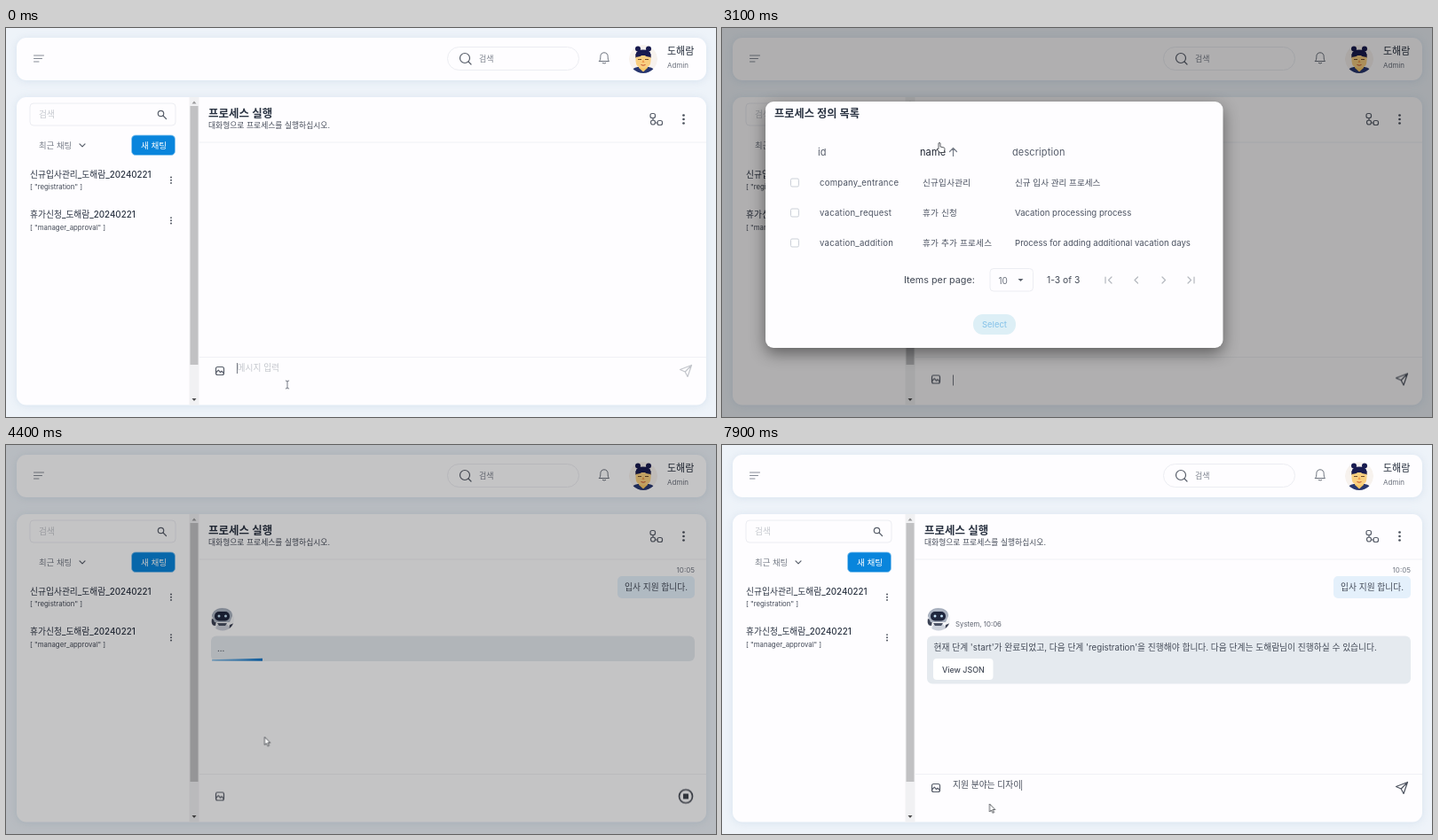
These frames come from a looping animation (800x439 px, 8 s). An HTML page:

```html
<!DOCTYPE html>
<html lang="ko">
<head>
<meta charset="utf-8">
<title>프로세스 실행</title>
<style>
html, body { margin: 0; width: 100%; height: 100%; overflow: hidden; background: #eef3f9; }
svg { display: block; width: 100vw; height: 100vh; }
text { font-family: Inter, "Noto Sans CJK KR", "Noto Sans CJK", sans-serif; fill: #444b58; white-space: pre; }
.b { font-weight: 600; fill: #2a3342; }
.m { font-weight: 500; }
.t8 { font-size: 8px; }
.t9 { font-size: 9.75px; }
.item { font-size: 9.75px; font-weight: 500; fill: #2a3342; }
.state { font-size: 7.8px; }
.cell { font-size: 9.6px; fill: #4b5261; }
.sp { letter-spacing: .22px; }
.head { font-size: 11px; fill: #555c6a; letter-spacing: .12px; }
.line { fill: none; stroke: #585e6a; stroke-width: 1.2; stroke-linecap: round; stroke-linejoin: round; }
.card { fill: #fefdff; filter: drop-shadow(0 1px 4px #c9d8e8a0); }
.box { fill: #fefdff; stroke: #ecedf2; }

.smooth, .step { animation-duration: 8s; animation-iteration-count: infinite; }
.smooth { animation-timing-function: ease-in-out; }
.step { animation-timing-function: step-end; }

.row { animation-name: row; }
@keyframes row {
  0%, 85.6%, 100% { transform: none; }
  32.5% { transform: translateY(var(--dy)); }
}
.chat { animation-name: chat; }
@keyframes chat { 0% { opacity: 0; } 51.25%, 100% { opacity: 1; } }
.wait { animation-name: wait; }
@keyframes wait { 0%, 75%, 100% { opacity: 0; } 51.25% { opacity: 1; } }
.reply { animation-name: reply; }
@keyframes reply { 0% { opacity: 0; } 75%, 100% { opacity: 1; } }
.send { animation-name: send; }
@keyframes send {
  0% { stroke: #c2c5cb; opacity: 1; }
  1.2%, 75%, 100% { stroke: #4d535f; opacity: 1; }
  51.25% { stroke: #4d535f; opacity: 0; }
}
.bar { animation-name: bar; animation-timing-function: linear; }
@keyframes bar {
  0%, 53.69%, 68.7% { transform: none; }
  68.69%, 83.7%, 100% { transform: translateX(651px); }
}
.dim { animation-name: dim; }
@keyframes dim { 0%, 36.3%, 57%, 100% { opacity: 0; } 38%, 53.9% { opacity: .31; } }
.modal { animation-name: modal; transform-origin: 306px 222px; }
@keyframes modal {
  0%, 36.3%, 52.8%, 100% { opacity: 0; transform: scale(.9); }
  38.5%, 51% { opacity: 1; transform: none; }
}
.checked { animation-name: checked; }
@keyframes checked { 0%, 100% { opacity: 0; } 44.4% { opacity: 1; } }
.select { animation-name: select; }
@keyframes select { 0%, 100% { opacity: .5; } 44.4% { opacity: 1; } }
.hover { animation-name: hover; }
@keyframes hover { 0%, 40.5%, 100% { fill: #555c6a; } 38% { fill: #1d2330; } }

.mouse { animation-name: mouse; }
@keyframes mouse {
  0%, 32.49% { transform: translate(317px, 402px); }
  33.75%, 36.25% { transform: translate(296.5px, 327px); }
  38.5%, 40% { transform: translate(244px, 129px); }
  43.5%, 45.5% { transform: translate(82px, 172px); }
  50%, 53.75% { transform: translate(292px, 329.5px); }
  57.5%, 82.6% { transform: translate(289.5px, 329.5px); }
  85%, 100% { transform: translate(301.5px, 405px); }
}
.ibeam { animation-name: ibeam; }
@keyframes ibeam { 0%, 100% { opacity: 1; } 32.5% { opacity: 0; } }
.arrow { animation-name: arrow; }
@keyframes arrow {
  0%, 38.3%, 42.8%, 49.3% { opacity: 0; }
  32.5%, 40.3%, 45.8%, 51.4%, 100% { opacity: 1; }
}
.hand { animation-name: hand; }
@keyframes hand {
  0%, 40.3%, 45.8%, 51.4%, 100% { opacity: 0; }
  38.3%, 42.8%, 49.3% { opacity: 1; }
}
</style>
</head>
<body>
<svg viewBox="0 0 800 439" preserveAspectRatio="none">
  <defs>
    <linearGradient id="glow">
      <stop offset="0" stop-color="#1a7fd0" stop-opacity="0"/>
      <stop offset=".5" stop-color="#5aa9e4" stop-opacity=".7"/>
      <stop offset="1" stop-color="#0f74c8"/>
    </linearGradient>
    <clipPath id="track"><rect x="232" y="238" width="541" height="8"/></clipPath>
    <clipPath id="face"><circle cx="718" cy="35" r="16"/></clipPath>
    <clipPath id="botClip"><circle cx="244" cy="196.5" r="13"/></clipPath>
    <g id="dots"><circle cy="-3.2" r=".95"/><circle r=".95"/><circle cy="3.2" r=".95"/></g>
    <rect id="check" x="77.5" y="-4.5" width="9" height="9" rx="1.5" fill="#fff" stroke="#cbd0d8"/>
  </defs>

  <rect width="800" height="439" fill="#eef3f9"/>
  <rect class="card" x="12" y="11" width="777" height="48" rx="11"/>
  <rect class="card" x="12" y="78" width="777" height="347.5" rx="11"/>

  <!-- top bar -->
  <path class="line" d="M31.5 31h11M31.5 34.5h9M31.5 38h5.5" style="stroke:#858b95;stroke-width:1"/>
  <rect class="box" x="497.5" y="21.5" width="148" height="26" rx="13"/>
  <g class="line"><circle cx="517" cy="34" r="5.5"/><path d="M521 38l3 3"/></g>
  <text x="533" y="38" font-size="9" style="fill:#7c828d">검색</text>
  <path class="line" d="M668.5 37.5h11c-1.300-1.500-1.300-3-1.300-5 0-3-1.700-4.700-4.200-4.700s-4.200 1.700-4.200 4.700c0 2 0 3.500-1.300 5zM672.300 39.500q1.700 1.300 3.400 0" style="stroke:#6b717c;stroke-width:1"/>
  <g clip-path="url(#face)">
    <circle cx="718" cy="35" r="16" fill="#f7f2ee"/>
    <path d="M705 51q0-6.5 7-7h12q7 .5 7 7v1h-26z" fill="#27366f"/>
    <path d="M713 43h10v2l-5 4.500-5-4.500z" fill="#f7c766"/>
    <path d="M709.500 34v-4q1-5.500 8.500-5.500t8.500 5.500v4z" fill="#181b50"/>
    <path d="M709.500 31h17v6q0 8-8.500 8.500-8.500-.5-8.500-8.500z" fill="#f9cf80"/>
    <path d="M709.500 33v-3q1-5 8.500-5t8.500 5v3q-6-.5-8.500-3.500-2.500 3-8.500 3.500z" fill="#181b50"/>
    <path d="M712 35.500h4M720 35.500h4" stroke="#6d4a2b" stroke-width="1"/>
    <path d="M718 35.500l1.500 3.500h-3z" fill="#ef9a4a"/>
    <path d="M715.500 41.500q2.500 1.500 5 0" fill="none" stroke="#c2512f"/>
  </g>
  <g fill="#181b50"><circle cx="712" cy="23.500" r="3"/><circle cx="724" cy="23.500" r="3"/></g>
  <text class="m" x="745" y="30.200" font-size="11" style="fill:#222b3a">도해람</text>
  <text class="t8" x="745" y="45" style="fill:#6b717d">Admin</text>

  <!-- sidebar -->
  <rect class="box" x="27" y="85" width="164" height="25" rx="4"/>
  <text class="t9" x="37" y="101" style="fill:#c6c9cf">검색</text>
  <g class="line"><circle cx="174.500" cy="96.500" r="3.200"/><path d="M177 99l3.500 3.500"/></g>
  <text x="37" y="135.700" font-size="9.400" style="fill:#777d88">최근 채팅</text>
  <path class="line" d="M83 130.800l3 3 3-3"/>
  <rect x="141.500" y="121" width="49" height="22.500" rx="4.500" fill="#0985dc" stroke="#8fc8f0" stroke-width=".8"/>
  <text class="m" x="152" y="135.700" font-size="9.600" style="fill:#fff">새 채팅</text>
  <text class="item" x="27" y="168.700">신규입사관리_도해람_20240221</text>
  <text class="state" x="27" y="182.200">[ "registration" ]</text>
  <text class="item" x="27" y="214.200">휴가신청_도해람_20240221</text>
  <text class="state" x="27" y="227.700">[ "manager_approval" ]</text>
  <g fill="#4a505c">
    <use href="#dots" x="186" y="171.700"/>
    <use href="#dots" x="186" y="217.300"/>
    <use href="#dots" transform="translate(763.500 103) scale(1.400)"/>
  </g>
  <rect x="206.500" y="78" width="11" height="347.500" fill="#f1f1f3"/>
  <rect x="207.500" y="88" width="9" height="292" fill="#c1c1c3"/>
  <path d="M209.500 85.500l2.500-3 2.500 3z" fill="#9a9a9c"/>
  <path d="M209.500 418l2.500 3 2.500-3z" fill="#4c4c4e"/>

  <!-- chat head -->
  <text class="b" x="228" y="100.700" font-size="12.500">프로세스 실행</text>
  <text x="228" y="113.300" font-size="8.800">대화형으로 프로세스를 실행하십시오.</text>
  <g class="line"><rect x="726" y="96.500" width="5.500" height="5" rx="2"/><circle cx="729" cy="106.500" r="2.500"/><rect x="734" y="104.500" width="5.500" height="5" rx="2"/><path d="M729 101.500v2.500M731.500 107h2.500"/></g>
  <path d="M218 129h571M218 371.500h571" stroke="#f0f1f5"/>

  <!-- messages -->
  <g class="step chat">
    <text class="t8" x="776" y="143.500" text-anchor="end" style="fill:#737985">10:05</text>
    <rect x="689" y="148" width="87" height="25" rx="5" fill="#e4f0fb"/>
    <text class="t9" x="697" y="163.600">입사 지원 합니다.</text>
    <g clip-path="url(#botClip)">
      <rect x="231" y="183" width="26" height="27" fill="#f3f4f7"/>
      <path d="M232 196l5 2-1 6-5-1zM252 203l5-2v8h-6z" fill="#3b4154"/>
      <path d="M236 210q0-9 8-9t8 9z" fill="#cdd2dc"/>
      <path d="M238 201h11l-2 3h-7z" fill="#4a5164"/>
      <path d="M232 193q0-9 11.500-9t11.500 9l-3 7h-17z" fill="#aab2c0"/>
      <rect x="235" y="188" width="17" height="10.500" rx="5" fill="#1f263d"/>
      <g fill="#c3e0f5"><circle cx="240" cy="193" r="1.500"/><circle cx="247.500" cy="193" r="1.500"/></g>
    </g>
  </g>
  <g class="step wait">
    <rect x="231" y="215.500" width="545" height="28.500" rx="6" fill="#e5eaef"/>
    <text class="t9" x="238" y="232.500">...</text>
    <g clip-path="url(#track)"><path class="smooth bar" d="M122 243.500L232 240.800V243.800z" fill="url(#glow)"/></g>
  </g>
  <g class="step reply">
    <text x="263" y="205" font-size="7.800" style="fill:#5b616d">System, 10:06</text>
    <rect x="231" y="215.500" width="545" height="54" rx="6" fill="#e5eaef"/>
    <text class="t9" x="238.500" y="231.600">현재 단계 'start'가 완료되었고, 다음 단계 'registration'을 진행해야 합니다. 다음 단계는 도해람님이 진행하실 수 있습니다.</text>
    <rect x="238" y="241" width="67.500" height="24" rx="4" fill="#fff"/>
    <text class="m" x="248" y="256.500" font-size="8.900">View JSON</text>
  </g>

  <!-- message field -->
  <g class="step row" style="--dy:9.5px">
    <g class="line"><rect x="236.500" y="382.500" width="9" height="9" rx="2"/><path d="M237 388.500l2.300-2.300 2.200 2.300 1.500-1.300 2.200 2"/></g>
    <path class="line step send" d="M759.500 385.500l13-5-4.500 13-2.800-5.500zM765.200 388l7.300-7.500"/>
    <g class="step wait"><circle cx="766" cy="387" r="7.500" fill="none" stroke="#4a4f59" stroke-width="1.700"/><rect x="763" y="384" width="6" height="6" rx=".5" fill="#3f444e"/></g>
  </g>
  <text class="t9" id="hint" x="260.500" y="386.800" style="fill:#c3c6cc">메시지 입력</text>
  <g class="step row" style="--dy:13.5px">
    <text class="t9" id="msg" x="260" y="386.800"></text>
    <rect id="caret" x="260" y="378" width=".8" height="12" fill="#555b67"/>
  </g>

  <!-- process list -->
  <rect class="smooth dim" width="800" height="439"/>
  <g class="smooth modal">
    <rect x="49" y="83" width="515.500" height="278" rx="9" fill="#fefdff" style="filter:drop-shadow(0 6px 9px #0007)"/>
    <text class="b" x="59" y="101.300" font-size="12.200">프로세스 정의 목록</text>
    <text class="head" x="108" y="144">id</text>
    <text class="head step hover" x="223" y="144">name</text>
    <path class="line" d="M260.500 144.500v-8.500M256.500 139.500l4-4 4 4" style="stroke:#777d88"/>
    <text class="head" x="327" y="144">description</text>
    <use href="#check" y="174.500"/><use href="#check" y="208.500"/><use href="#check" y="242.500"/>
    <g class="step checked"><rect x="77" y="169.500" width="10" height="10" rx="2" fill="#0985dc"/><path class="line" d="M79.500 174.500l2 2 3.500-4" style="stroke:#fff"/></g>
    <text class="cell sp" x="110" y="178">company_entrance</text>
    <text class="cell sp" x="226" y="178">신규입사관리</text>
    <text class="cell" x="330" y="178">신규 입사 관리 프로세스</text>
    <text class="cell sp" x="110" y="212">vacation_request</text>
    <text class="cell sp" x="226" y="212">휴가 신청</text>
    <text class="cell" x="330" y="212">Vacation processing process</text>
    <text class="cell sp" x="110" y="246">vacation_addition</text>
    <text class="cell sp" x="226" y="246">휴가 추가 프로세스</text>
    <text class="cell" x="330" y="246">Process for adding additional vacation days</text>
    <text x="205" y="288" font-size="10.800">Items per page:</text>
    <rect class="box" x="302" y="271.500" width="48.500" height="25.500" rx="4"/>
    <text x="311.500" y="288.500" font-size="10" style="fill:#6b717d">10</text>
    <path d="M333.500 283h6l-3 3z" fill="#5b616d"/>
    <text x="366" y="288" font-size="10.300">1-3 of 3</text>
    <path class="line" d="M432 281v7M439 281l-3.500 3.500 3.500 3.500M468.500 281l-3.500 3.500 3.500 3.500M496 281l3.500 3.500-3.500 3.500M525 281l3.500 3.500-3.500 3.500M532 281v7" style="stroke:#b4b8bf"/>
    <rect x="283" y="323" width="48" height="23" rx="11" fill="#ddeff6"/>
    <text class="m step select" x="293" y="338" font-size="9.400" style="fill:#3f9fdf">Select</text>
  </g>

  <!-- pointer -->
  <g class="smooth mouse">
    <path class="line step ibeam" d="M-1.700-4q1.700 0 1.700 1.200 0-1.200 1.700-1.200M0-2.800v6.600M-1.700 5q1.700 0 1.700-1.200 0 1.200 1.700 1.200" style="stroke-width:.8"/>
    <path class="step arrow" d="M0 0v9l2.100-1.900 1.500 3.200 1.500-.7-1.500-3.100h2.700z" fill="#fff" stroke="#33363d" stroke-width=".8"/>
    <path class="step hand" d="M0 1q1-1.300 2 0v4l4.200 1q1 .4.800 1.700l-.8 3.800H1.500L-1.800 8q0-1.500 1.800-.5z" fill="#fff" stroke="#33363d" stroke-width=".8"/>
  </g>
</svg>
<script>
const LOOP = 8000;
const LEADS = 'ㄱㄲㄴㄷㄸㄹㅁㅂㅃㅅㅆㅇㅈㅉㅊㅋㅌㅍㅎ';
const [hint, msg, caret] = ['hint', 'msg', 'caret'].map(id => document.getElementById(id));

// Every stage of a text as a Hangul input method composes it
function compose(text) {
  const stages = [''];
  let done = '';
  for (const ch of text) {
    const code = ch.charCodeAt(0) - 0xAC00;
    if (code >= 0) {
      const tail = code % 28;
      stages.push(done + LEADS[Math.floor(code / 588)]);
      if (tail) stages.push(done + String.fromCharCode(0xAC00 + code - tail));
    }
    stages.push(done += ch);
  }
  return stages;
}

const request = compose('입사 지원 합니다.');
const answer = compose('지원 분야는 디자이');

// Number of keys struck by time t, limited to max
const keys = (t, start, gap, max) => Math.max(0, Math.min(max, 1 + Math.floor((t - start) / gap)));

function typed(t) {
  if (t < 2600) return request[keys(t, 100, 114, 15) + keys(t, 2000, 100, 5)];
  return answer[keys(t, 6850, 49, answer.length - 1)];
}

let start;
function draw(now) {
  start ??= now;
  const t = (now - start) % LOOP;
  const text = typed(t);
  if (msg.textContent !== text) msg.textContent = text;
  caret.setAttribute('x', 260 + (text ? msg.getComputedTextLength() : 0));
  caret.style.opacity = t < 4100 || t > 6800 ? 1 : 0;
  hint.style.opacity = t < 100 ? 1 : 0;
  requestAnimationFrame(draw);
}
requestAnimationFrame(draw);
</script>
</body>
</html>
```
